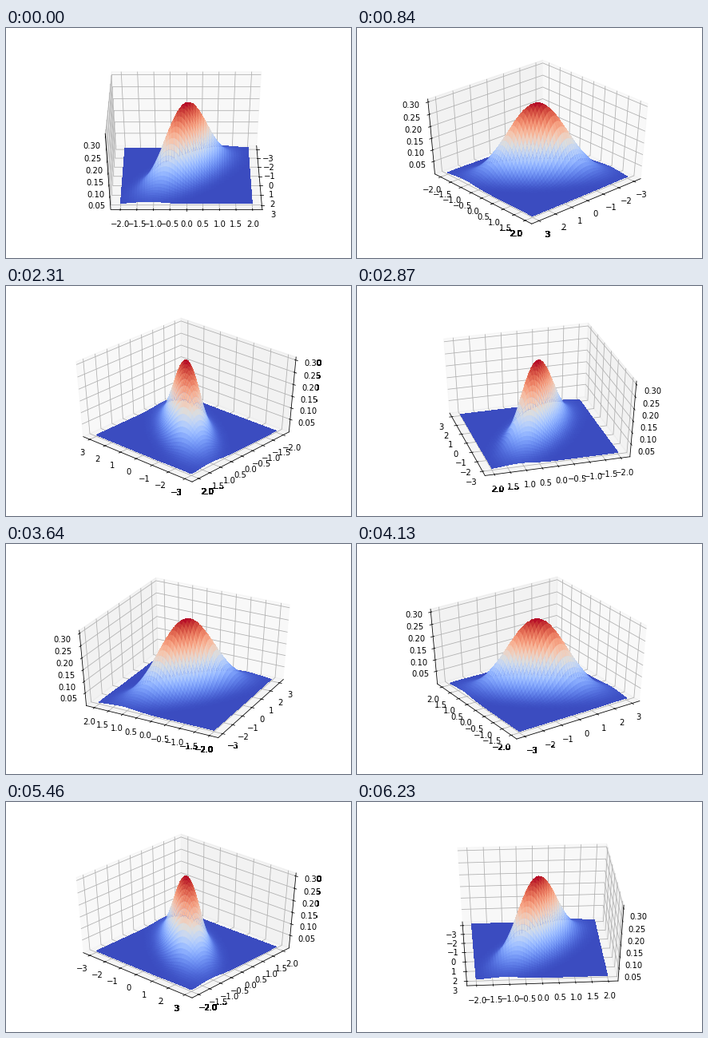
A matplotlib script for the animation above (6300 ms loop, 432 by 288 pixels).

```python
import math

import numpy as np
import matplotlib.pyplot as plt
from matplotlib.animation import FuncAnimation

FRAMES = 90
STEP = 360 // FRAMES
PAD = 25 / 24  # space between the limits and the drawn box


def gaussian(x, y, var_x, var_y, cov):
    det = var_x * var_y - cov ** 2
    q = (var_y * x ** 2 - 2 * cov * x * y + var_x * y ** 2) / det
    return np.exp(-q / 2) / (2 * math.pi * math.sqrt(det))


def solid(img, dpi):
    """Drop partial transparency, so text outside the white panel is hard-edged."""
    out = np.rint(img * 255).astype(np.uint8)
    out[..., 3] = np.where(out[..., 3] > 0, 255, 0)
    return out, 0, 0


X, Y = np.meshgrid(np.linspace(-3, 3, 50), np.linspace(-2, 2, 50))
Z = gaussian(X, Y, 1.3, 0.4, -0.5)
top = Z.max()

fig = plt.figure(figsize=(6, 4), dpi=72, facecolor="white")
fig.subplots_adjust(left=0.125, right=0.9, bottom=0.125, top=0.88)
ax = fig.add_subplot(projection="3d")
ax.apply_aspect = lambda position=None: None  # let the view fill the wide panel
ax.set_agg_filter(solid)

ax.plot_surface(X, Y, Z, cmap="coolwarm", linewidth=0)

ax.set_xlim(-3.3 * PAD, 3.3 * PAD)
ax.set_ylim(-2.2 * PAD, 2.2 * PAD)
ax.set_zlim(-top / 48, top * (1 + 1 / 48))
ax.set_xticks(np.arange(-3, 4))
ax.set_yticks(np.arange(-2, 2.1, 0.5))
ax.set_zticks(np.arange(1, 7) * 0.05)
ax.zaxis.set_major_formatter("{x:.2f}")
# The zoom undoes the built-in scale, leaving a unit cube.
ax.set_box_aspect((1, 1, 1), zoom=math.sqrt(3) / 1.8294640721620434)


def update(i):
    ax.view_init(elev=40, azim=STEP * i)
    return []


anim = FuncAnimation(fig, update, frames=FRAMES, interval=70,
                     init_func=lambda: update(0), repeat=True, repeat_delay=0)
plt.show()
```
